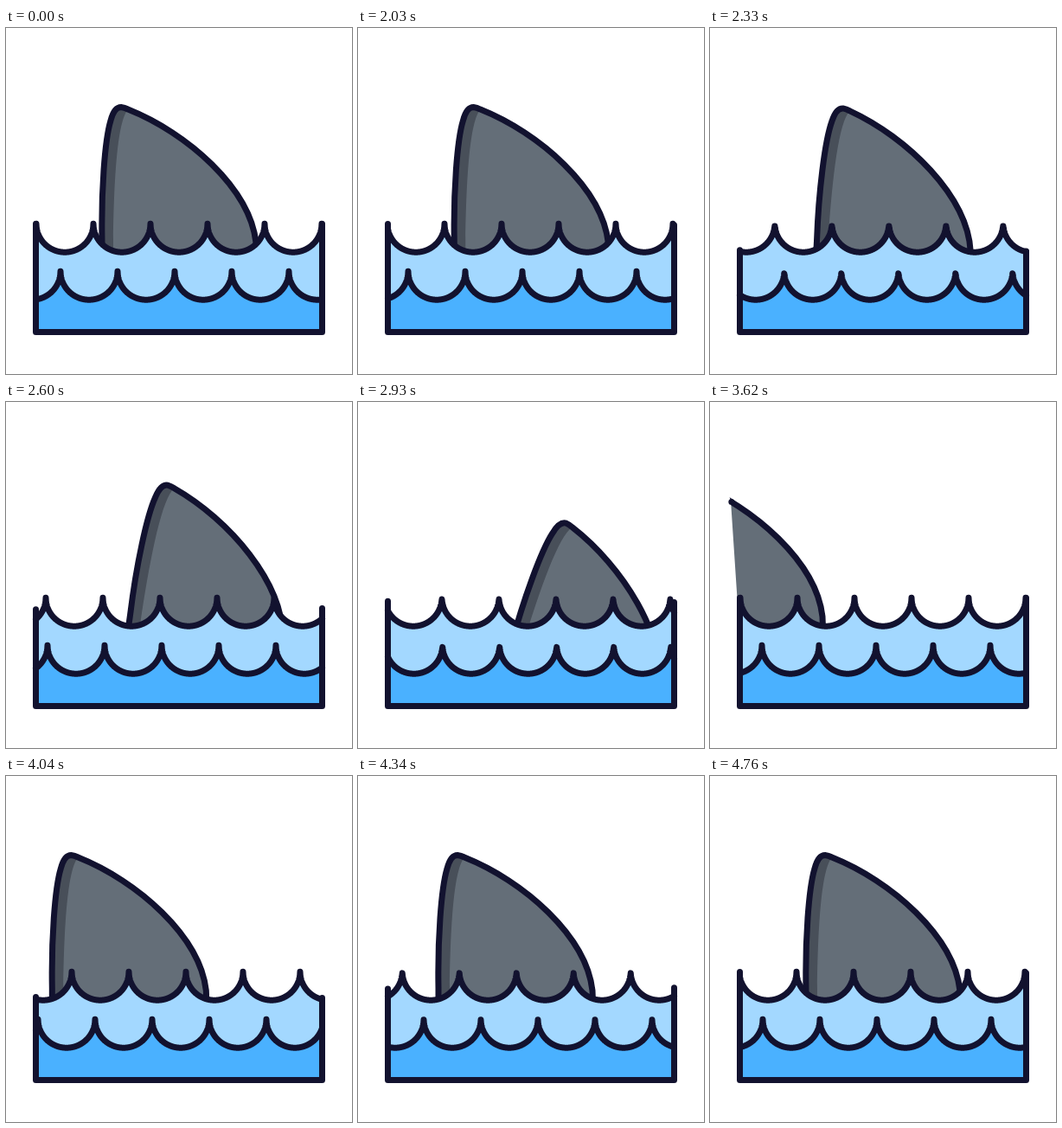
Recreate the animation shown at these times as an HTML page with a canvas. Size 400x400 px, loop 4.79 s.

```html
<!DOCTYPE html>
<html lang="en">
<head>
<meta charset="utf-8">
<title>Shark fin</title>
<style>
  html, body { margin: 0; width: 100%; height: 100%; overflow: hidden; background: #fff; }
  canvas { display: block; width: 400px; height: 400px; }
</style>
</head>
<body>
<canvas id="stage" width="400" height="400"></canvas>
<script>
const ctx = document.getElementById('stage').getContext('2d');

const LOOP = 4790, HOLD = 2030, STEP = 30, STEPS = 93;
const LEFT = 34.5, RIGHT = 365.5, BOTTOM = 351.5;
const R = 33, PERIOD = 2 * R;
const INK = '#12122f', LIGHT = '#a3d8ff', BLUE = '#4ab1ff';
const GREY = '#646e78', SHADE = '#484f59';

// Distance each wave still has to travel: [step, px]
const BACK = [[1, 331], [20, 253], [44, 151], [54, 132], [68, 91], [92, 1], [93, 0]];
const FRONT = [[1, 335], [20, 279], [44, 168], [54, 135], [68, 92], [92, 2], [93, 0]];

const FIN_LEFT = 'M111 300 L111 245 C110 190 114 130 121 107 Q125 91.5 133 91.5 Q137 92 141 94';
const fin = new Path2D(FIN_LEFT + ' C209 121 282 185 289 248 L291 300');
const shade = new Path2D(FIN_LEFT + ' C129 108 125 170 124 245 L124 300 Z');
const SLOPE = [[141, 94], [209, 121], [282, 185], [289, 248]];

// Slanted boundary from behind which the fin appears
const edgeX = y => y < 114 ? 24 - (114 - y) * 0.34 : 24 + (y - 114) * 0.066;

const finMask = new Path2D();
finMask.moveTo(edgeX(60), 60);
finMask.lineTo(24, 114);
finMask.lineTo(33, 250);
finMask.lineTo(LEFT, 300);
finMask.lineTo(RIGHT, 300);
finMask.lineTo(RIGHT, 60);
finMask.closePath();

// Monotone cubic interpolation through the keys
function follow(keys, n) {
  const slope = i => (keys[i + 1][1] - keys[i][1]) / (keys[i + 1][0] - keys[i][0]);
  const last = keys.length - 1;
  const tangent = i => {
    if (i === 0) return slope(0);
    if (i === last) return slope(last - 1);
    const a = slope(i - 1), b = slope(i);
    return 2 * a * b / (a + b);
  };
  let i = 0;
  while (i < last - 1 && n > keys[i + 1][0]) i++;
  const [x0, y0] = keys[i], [x1, y1] = keys[i + 1];
  const h = x1 - x0, t = (n - x0) / h, u = 1 - t;
  return y0 * (1 + 2 * t) * u * u + h * tangent(i) * t * u * u
       + y1 * t * t * (3 - 2 * t) - h * tangent(i + 1) * t * t * u;
}

const mod = (a, b) => ((a % b) + b) % b;

function wavePath(crest, top) {
  const path = new Path2D();
  for (let x = LEFT; x <= RIGHT; x += 0.25) {
    const d = mod(x - crest, PERIOD) - R;
    path.lineTo(x, top + Math.sqrt(R * R - d * d));
  }
  return path;
}

function drawWave(crest, top, color) {
  const line = wavePath(crest, top);
  const body = new Path2D(line);
  body.lineTo(RIGHT, BOTTOM);
  body.lineTo(LEFT, BOTTOM);
  ctx.fillStyle = color;
  ctx.fill(body);
  ctx.stroke(line);
}

function sideTop(x, crest) {
  const d = mod(x - crest, PERIOD);
  return Math.min(258, 226 + 1.2 * Math.min(d, PERIOD - d));
}

// Round end of the outline where the boundary cuts the slope
function drawCut(shift) {
  if (133 + shift > edgeX(92)) return;
  for (let t = 0; t <= 1; t += 0.005) {
    const u = 1 - t, w = [u * u * u, 3 * u * u * t, 3 * u * t * t, t * t * t];
    const at = k => w.reduce((sum, v, i) => sum + v * SLOPE[i][k], 0);
    const x = at(0) + shift, y = at(1);
    if (x >= edgeX(y)) {
      if (t === 0 || y > 235) return;
      ctx.fillStyle = INK;
      ctx.beginPath();
      ctx.arc(x, y, 3.5, 0, 2 * Math.PI);
      ctx.fill();
      return;
    }
  }
}

function drawFin(n) {
  const leaving = n < 44;
  const shift = -159 * Math.pow((STEPS - n) / 39, 2.28);
  ctx.save();
  ctx.clip(finMask);
  if (leaving) {
    const u = Math.pow(n / 20, 1.6);
    const sink = 0.3 * Math.pow(Math.max(0, n - 20), 2);
    ctx.translate(111 + 32 * u, 250 + sink);
    ctx.rotate(8 * u * Math.PI / 180);
    ctx.translate(-111, -250);
  } else {
    ctx.translate(shift, 0);
  }
  ctx.fillStyle = GREY;
  ctx.fill(fin);
  ctx.fillStyle = SHADE;
  ctx.fill(shade);
  ctx.stroke(fin);
  ctx.restore();
  if (!leaving) drawCut(shift);
}

function draw(n) {
  const back = 35 - (n ? follow(BACK, n) : 0);
  const front = 63 - (n ? follow(FRONT, n) : 0);
  ctx.fillStyle = '#fff';
  ctx.fillRect(0, 0, 400, 400);
  ctx.strokeStyle = INK;
  ctx.lineWidth = 7;
  ctx.lineCap = ctx.lineJoin = 'round';

  drawFin(n);
  drawWave(back, 226.2, LIGHT);
  drawWave(front, 281.2, BLUE);

  ctx.beginPath();
  ctx.moveTo(LEFT, sideTop(LEFT, back));
  ctx.lineTo(LEFT, BOTTOM);
  ctx.lineTo(RIGHT, BOTTOM);
  ctx.lineTo(RIGHT, sideTop(RIGHT, back));
  ctx.stroke();
}

const start = performance.now();
function frame() {
  const t = (performance.now() - start) % LOOP;
  draw(t < HOLD ? 0 : Math.min(STEPS - 1, 1 + Math.floor((t - HOLD) / STEP)));
  requestAnimationFrame(frame);
}
frame();
</script>
</body>
</html>
```
